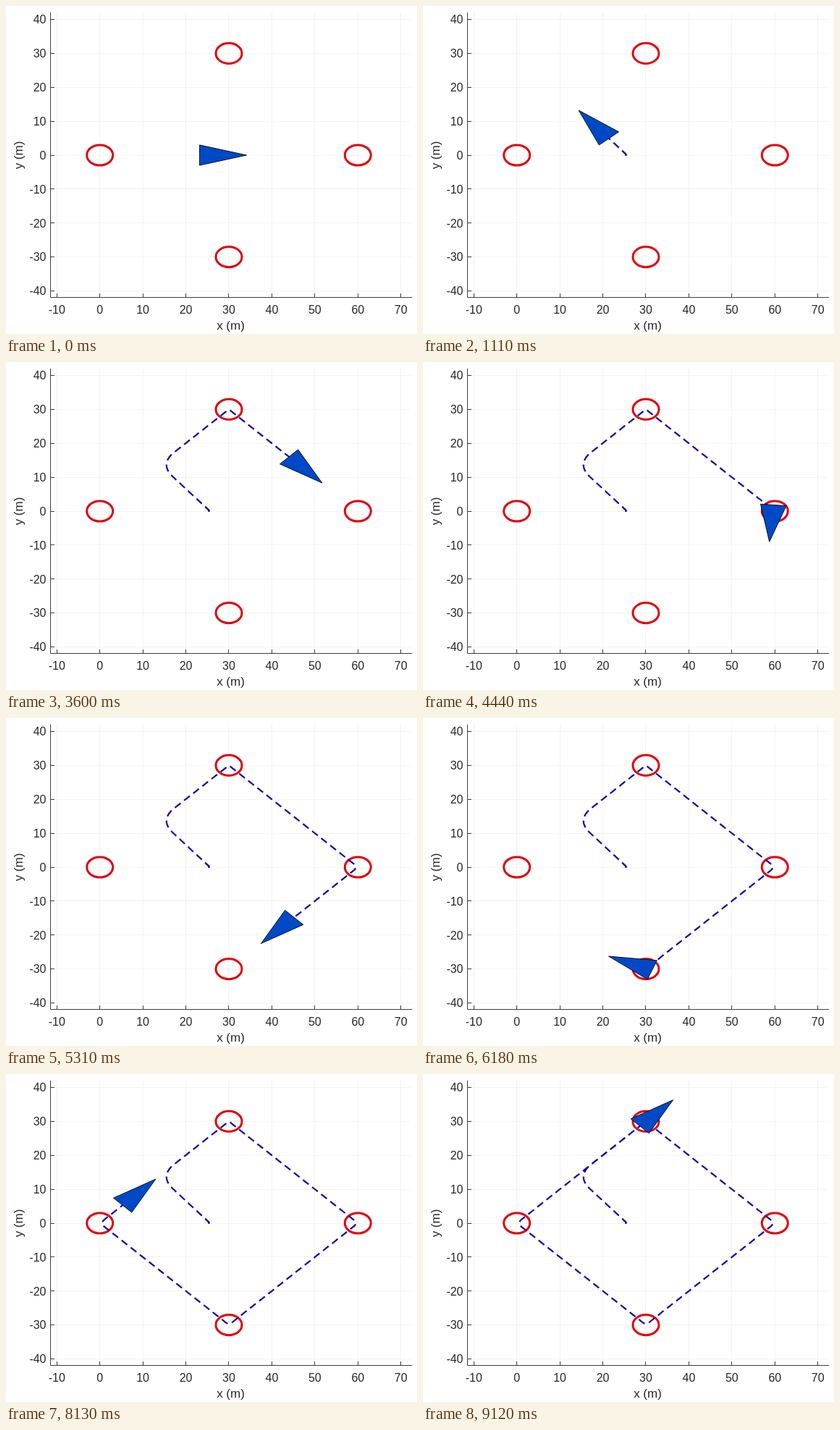
Write an HTML page that moves like this. It is 568 by 453 pixels and loops after 9.15 s.

```html
<!DOCTYPE html>
<html lang="en">
<head>
<meta charset="utf-8">
<title>Waypoint following</title>
<style>
html, body { margin: 0; width: 100%; height: 100%; overflow: hidden; background: #fff; }
svg { display: block; width: 568px; height: 453px; }
text { font: 16px "Liberation Sans", Arial, sans-serif; fill: #262626; }
text.label { font-size: 17px; }
</style>
</head>
<body>
<svg viewBox="0 0 568 453">
  <g id="grid" stroke="#f2f2f2"></g>
  <g id="ticks" stroke="#3c3c3c"></g>
  <path d="M61.5 9V402.5H561" fill="none" stroke="#3c3c3c"/>
  <g id="numbers"></g>
  <text class="label" x="310.5" y="447" text-anchor="middle">x (m)</text>
  <text class="label" transform="translate(22.5 206) rotate(-90)" text-anchor="middle">y (m)</text>
  <g id="goals" fill="none" stroke="#e0060f" stroke-width="3"></g>
  <path id="trail" fill="none" stroke="#1200a8" stroke-width="2.2" stroke-dasharray="10 6.04"/>
  <path id="vehicle" fill="#0049c6" stroke="#0a1020" stroke-linejoin="round"/>
</svg>
<script>
const LOOP = 9150, STEP = 30;
const byId = id => document.getElementById(id);
const px = x => 129.7 + 5.943 * x;
const py = y => 206 - 4.685 * y;
const point = (x, y) => px(x).toFixed(2) + ' ' + py(y).toFixed(2);
const mix = (a, b, k) => a + (b - a) * k;

function add(parent, tag, attrs, text = '') {
  const node = document.createElementNS('http://www.w3.org/2000/svg', tag);
  for (const key in attrs) node.setAttribute(key, attrs[key]);
  node.textContent = text;
  byId(parent).append(node);
}

function line(parent, x1, y1, x2, y2) {
  add(parent, 'line', { x1, y1, x2, y2 });
}

function drawAxes() {
  for (let v = -10; v <= 70; v += 10) {
    const x = Math.floor(px(v)) + 0.5;
    line('grid', x, 9, x, 402);
    line('ticks', x, 402, x, 397);
    add('numbers', 'text', { x: px(v), y: 425, 'text-anchor': 'middle' }, v);
  }
  for (let v = -40; v <= 40; v += 10) {
    const y = Math.floor(py(v)) + 0.5;
    line('grid', 62, y, 560, y);
    line('ticks', 62, y, 67, y);
    add('numbers', 'text', { x: 55.5, y: py(v) + 5.8, 'text-anchor': 'end' }, v);
  }
  for (let i = 0; i < 4; i++) {
    const a = i * Math.PI / 2;
    add('goals', 'ellipse', { cx: px(30 + 30 * Math.cos(a)), cy: py(30 * Math.sin(a)), rx: 18, ry: 14.1 });
  }
}

// Corners of the route: the turn lasts from arrive to leave and is cut by a curve.
const route = [
  { arrive: 0, leave: 540, x: 25.6, y: 0, cut: 0.45 },
  { arrive: 1455, leave: 1975, x: 13.8, y: 13.9, cut: 5 },
  { arrive: 2650, leave: 2820, x: 30, y: 30, cut: 0.3 },
  { arrive: 4303, leave: 4550, x: 60, y: 0, cut: 1.4 },
  { arrive: 5964, leave: 6256, x: 30, y: -30, cut: 1 },
  { arrive: 7514, leave: 7895, x: 0, y: 0, cut: 1.6 },
  { arrive: 9120, leave: LOOP, x: 30, y: 30, cut: 0 }
];

route.forEach((c, i) => {
  const next = route[i + 1];
  c.from = i ? route[i - 1].to : 0;
  c.to = next ? Math.atan2(next.y - c.y, next.x - c.x) : c.from;
  const turn = c.to - c.from;
  c.turn = Math.atan2(Math.sin(turn), Math.cos(turn));
  c.entry = { x: c.x - c.cut * Math.cos(c.from), y: c.y - c.cut * Math.sin(c.from) };
  c.exit = { x: c.x + c.cut * Math.cos(c.to), y: c.y + c.cut * Math.sin(c.to) };
});

function poseAt(t) {
  const i = route.findLastIndex(c => c.arrive <= t);
  const c = route[i], next = route[i + 1];
  if (t < c.leave) {
    const k = (t - c.arrive) / (c.leave - c.arrive);
    const curve = axis => mix(mix(c.entry[axis], c[axis], k), mix(c[axis], c.exit[axis], k), k);
    return { x: curve('x'), y: curve('y'), heading: c.from + c.turn * k };
  }
  const k = (t - c.leave) / (next.arrive - c.leave);
  return { x: mix(c.exit.x, next.entry.x, k), y: mix(c.exit.y, next.entry.y, k), heading: c.to };
}

function draw(t) {
  const { x, y, heading } = poseAt(t);
  const c = Math.cos(heading), s = Math.sin(heading);
  const corners = [[-1.95, 3], [-1.95, -3], [8.95, 0]]
    .map(([u, v]) => point(x + u * c - v * s, y + u * s + v * c));
  byId('vehicle').setAttribute('d', 'M' + corners.join('L') + 'Z');

  const passed = [];
  for (let past = 0; past <= t; past += STEP) {
    const p = poseAt(past);
    passed.push(point(p.x, p.y));
  }
  byId('trail').setAttribute('d', 'M' + passed.join('L'));
}

const start = performance.now();
function frame() {
  const t = (performance.now() - start) % LOOP;
  draw(Math.floor(t / STEP) * STEP);
  requestAnimationFrame(frame);
}
drawAxes();
draw(0);
requestAnimationFrame(frame);
</script>
</body>
</html>
```
